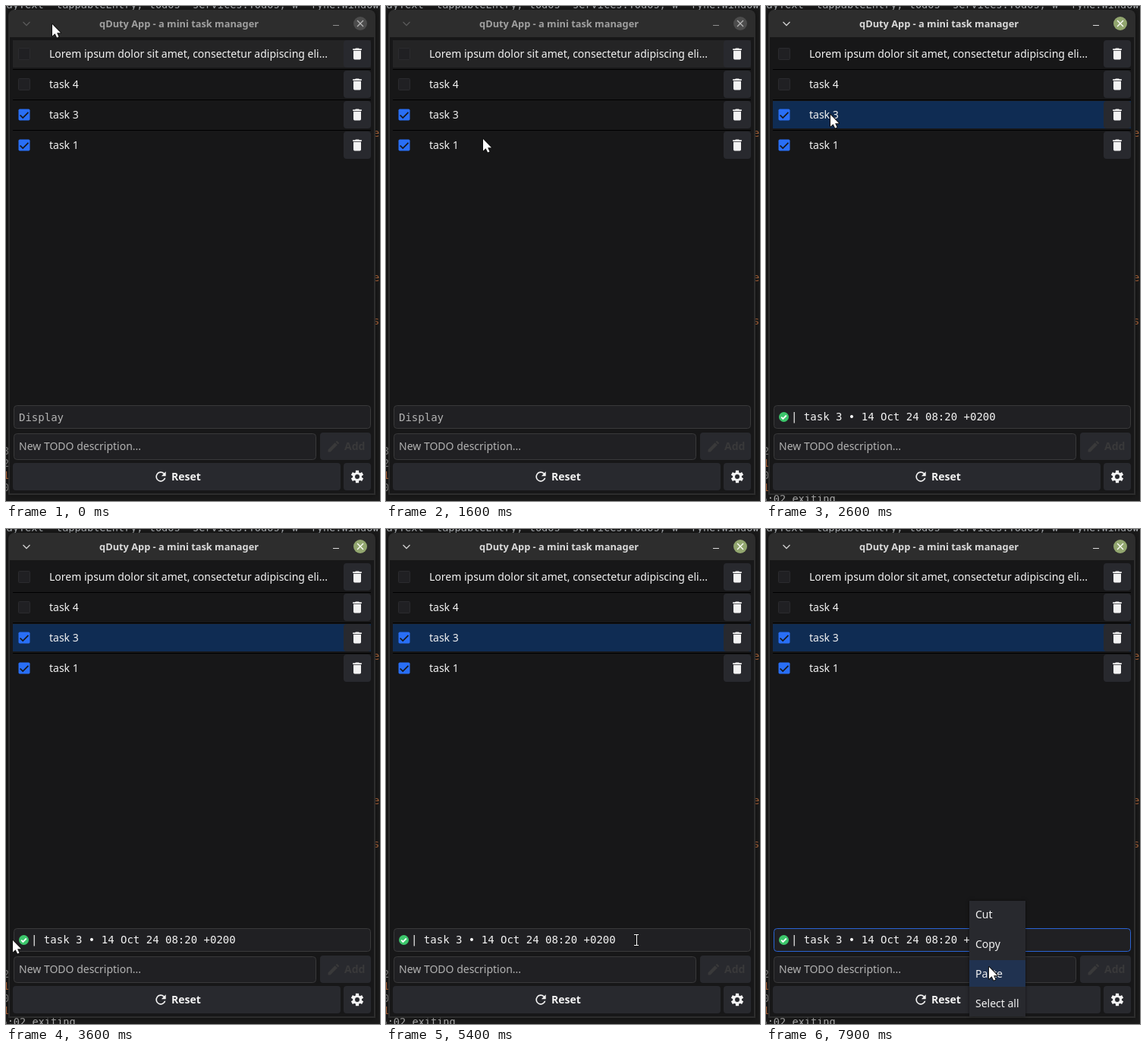
An HTML page with a canvas that plays this animation: 493x651 px, repeating every 8000 ms.

```html
<!DOCTYPE html>
<html lang="en">
<head>
<meta charset="utf-8">
<title>Task manager</title>
<style>
html, body { margin: 0; width: 100%; height: 100%; overflow: hidden; background: #1b1b1b; }
canvas { display: block; }
</style>
</head>
<body>
<canvas id="stage" width="493" height="651"></canvas>
<script>
const ctx = document.getElementById('stage').getContext('2d');
const LOOP = 8000, STEP = 100;
const SANS = '"Noto Sans", sans-serif';
const MONO = '"DejaVu Sans Mono", monospace';
const BODY = '14px ' + SANS, BOLD = 'bold 14px ' + SANS, ENTRY = '14px ' + MONO, CODE = '13.6px ' + MONO;
const WHITE = '#f3f3f3', BASE = '#171718', BUTTON = '#28292e', INPUT = '#202023', EDGE = '#39393a';
const HINT = '#b2b2b2', BLUE = '#296ff6', HOVER = '#242425', SELECTED = '#0f2c53';

// Icons on a 24 unit grid
const CHECK = new Path2D('M5 3h14a2 2 0 0 1 2 2v14a2 2 0 0 1-2 2H5a2 2 0 0 1-2-2V5a2 2 0 0 1 2-2z');
const TRASH = new Path2D('M6 19a2 2 0 0 0 2 2h8a2 2 0 0 0 2-2V7H6zM19 4h-3.5l-1-1h-5l-1 1H5v2h14z');
const RELOAD = new Path2D('M17.65 6.35A8 8 0 1 0 19.73 14h-2.08A6 6 0 1 1 16.22 7.78L13 11h7V4z');
const PEN = new Path2D('M3 17.25V21h3.75L17.81 9.94l-3.75-3.75zM20.7 7l-3.75-3.75-1.85 1.85 3.75 3.75z');
const ARROW = new Path2D('M0 0V15.5L3.6 12.2 6.1 17.5 8.5 16.4 6.1 11.2H11Z');
const IBEAM = new Path2D('M-3 -6.5H3M.5 -6.5V7.5M-3 7.5H3');

const TASKS = ['Lorem ipsum dolor sit amet, consectetur adipiscing eli...', 'task 4', 'task 3', 'task 1'];
const MENU = ['Cut', 'Copy', 'Paste', 'Select all'];

// Each move bends from the previous end through `via` to `end`
const HOME = [61, 24];
const MOVES = [
  { from: 100, to: 200, end: [11, -20] },
  { from: 400, to: 1000, via: [200, 112], end: [404, 58] },
  { from: 1600, to: 1600, end: [128, 175] },
  { from: 1700, to: 2100, via: [-60, 200], end: [85, 143] },
  { from: 2900, to: 3600, via: [355, 620], end: [9, 541] },
  { from: 3700, to: 4200, end: [118, 539] },
  { from: 4400, to: 4900, via: [410, 538], end: [339, 539] },
  { from: 5300, to: 5400, end: [330, 540] },
  { from: 6200, to: 6400, end: [269, 541] },
  { from: 7800, to: 7900, via: [387, 540], end: [294, 576] }
];

function pointerAt(t) {
  const now = Math.floor(t / STEP) * STEP;
  let pos = HOME;
  for (const { from, to, via, end } of MOVES) {
    if (now < from) break;
    const p = Math.min(1, (now - from + STEP) / (to - from + STEP));
    const e = p * p * (3 - 2 * p), start = pos;
    pos = end.map((b, i) => {
      const a = start[i], c = via ? via[i] : (a + b) / 2;
      return a * (1 - e) ** 2 + 2 * c * e * (1 - e) + b * e * e;
    });
  }
  return pos.map(Math.round);
}

function text(s, x, y, font, color, align = 'left') {
  ctx.font = font;
  ctx.fillStyle = color;
  ctx.textAlign = align;
  ctx.fillText(s, x, y);
}

function rect(x, y, w, h, color) {
  ctx.fillStyle = color;
  ctx.fillRect(x, y, w, h);
}

function box(x, y, w, h, r, fill, edge) {
  const o = edge ? 0.5 : 0;
  ctx.beginPath();
  ctx.roundRect(x + o, y + o, w - 2 * o, h - 2 * o, r);
  ctx.fillStyle = fill;
  ctx.fill();
  if (edge) { ctx.strokeStyle = edge; ctx.lineWidth = 1; ctx.stroke(); }
}

function button(x, y, w) {
  box(x, y, w, 36, 4, BUTTON);
}

function line(points, color, width) {
  ctx.beginPath();
  points.forEach(([x, y]) => ctx.lineTo(x, y));
  ctx.strokeStyle = color;
  ctx.lineWidth = width;
  ctx.stroke();
}

function disc(x, y, r, color) {
  ctx.beginPath();
  ctx.arc(x, y, r, 0, 7);
  ctx.fillStyle = color;
  ctx.fill();
}

function tick(cx, cy, s, color, width) {
  line([[cx - 3 * s, cy], [cx - s, cy + 2 * s], [cx + 3 * s, cy - 2 * s]], color, width);
}

function icon(path, cx, cy, color) {
  ctx.save();
  ctx.translate(cx - 10, cy - 10);
  ctx.scale(20 / 24, 20 / 24);
  ctx.fillStyle = color;
  ctx.fill(path);
  ctx.restore();
}

function gear(cx, cy) {
  ctx.save();
  ctx.translate(cx, cy);
  disc(0, 0, 6, WHITE);
  for (let i = 0; i < 6; i++) {
    ctx.fillRect(-2.1, -8.2, 4.2, 4);
    ctx.rotate(Math.PI / 3);
  }
  disc(0, 0, 3, BUTTON);
  ctx.restore();
}

function shadowed(blur, paint) {
  ctx.save();
  ctx.shadowColor = 'rgba(0,0,0,.55)';
  ctx.shadowBlur = blur;
  paint();
  ctx.restore();
}

function backdrop(active) {
  const orange = '#b56a3d', gray = '#8c8c8c';
  rect(0, 0, 493, 651, '#1b1b1b');
  text('ayText *tappableEntry, todos *services.Todos, w *fyne.Window', 0.5, 3, CODE, '#b0b4b8');
  text('e', 484, 172, CODE, orange);
  text('ee', 484, 362, CODE, orange);
  text('ss', 484, 419, CODE, orange);
  [...(active ? '2101' : '3210')].forEach((d, i) => {
    text(d, -4, 590 + 16 * i, CODE, d === '1' ? orange : gray);
  });
  if (active) text('5:02 exiting', -6.5, 653, CODE, '#b0b0b0');
}

function frame(active) {
  shadowed(6, () => box(3, 5, 484, 638, [8, 8, 0, 0], '#2d2d2d'));
  rect(5, 41, 480, 600, BASE);
  const ink = active ? '#dadada' : '#8d8d8d', cross = active ? '#fff' : '#b4b4b4';
  text('qDuty App - a mini task manager', 333, 28, '600 12.8px ' + SANS, active ? '#dadada' : '#a0a0a0', 'right');
  line([[22.5, 21], [27, 25.5], [31.5, 21]], active ? '#d0d0d0' : '#5a5a5a', 1.3);
  rect(431, 25, 8, 1, ink);
  disc(467, 23, 9, active ? '#92a66f' : '#4c4c4c');
  for (const d of [-4, 4]) line([[467 - d, 19], [467 + d, 27]], cross, 1.3);
}

function list(active, picked) {
  TASKS.forEach((name, i) => {
    const y = 43 + 40 * i, mid = y + 20;
    if (!active && i === 0) rect(9, y + 2, 472, 36, HOVER);
    if (picked && i === 2) rect(9, y + 2, 472, 36, SELECTED);
    if (i) rect(9, y, 472, 1, '#000');
    if (i > 1) {
      icon(CHECK, 24, mid, BLUE);
      tick(24, mid + 0.5, 1.8, BASE, 1.7);
    } else {
      box(16, mid - 8, 16, 16, 1, INPUT, '#2b2b2e');
    }
    text(name, 57, mid + 5, BODY, WHITE);
    button(445, y + 2, 36);
    icon(TRASH, 463, mid, WHITE);
  });
}

function form(picked, focused) {
  box(10, 525, 471, 31, 4, INPUT, focused ? '#2a63d4' : EDGE);
  if (picked) {
    disc(23.5, 540.5, 6.5, '#3cc66c');
    tick(23.5, 540.7, 1.1, '#fff', 1.8);
    text('| task 3 • 14 Oct 24 08:20 +0200', 33, 545, ENTRY, WHITE);
  } else {
    text('Display', 17, 546, ENTRY, HINT);
  }
  box(10, 562, 399, 35, 4, INPUT, EDGE);
  text('New TODO description...', 17, 584, BODY, HINT);
  button(414, 561, 67);
  icon(PEN, 432, 579, EDGE);
  text('Add', 446, 584, BOLD, EDGE);
  button(9, 601, 432);
  icon(RELOAD, 204, 619, WHITE);
  text('Reset', 218, 624, BOLD, WHITE);
  button(445, 601, 36);
  gear(463, 619);
}

function menu(hover) {
  shadowed(4, () => rect(268, 489, 74, 152, BUTTON));
  MENU.forEach((name, i) => {
    const y = 489 + 39 * i;
    if (i === hover) rect(268, y, 74, 35, '#203250');
    text(name, 276, y + 23, BODY, WHITE);
  });
}

function pointer(t) {
  const beam = t >= 3700 && t < 7300;
  const shape = beam ? IBEAM : ARROW;
  ctx.save();
  ctx.translate(...pointerAt(t));
  ctx.lineJoin = 'round';
  ctx.strokeStyle = '#111';
  ctx.lineWidth = 2;
  ctx.stroke(shape);
  if (beam) {
    ctx.strokeStyle = '#fff';
    ctx.lineWidth = 1;
    ctx.stroke(shape);
  } else {
    ctx.fillStyle = '#fff';
    ctx.fill(shape);
  }
  ctx.restore();
}

function draw(t) {
  const active = t >= 2500, picked = t >= 2600;
  backdrop(active);
  frame(active);
  list(active, picked);
  form(picked, t >= 7200);
  if (t >= 7300) menu(t >= 7900 ? 2 : t >= 7800 ? 1 : -1);
  pointer(t);
}

const start = performance.now();
function loop() {
  draw((performance.now() - start) % LOOP);
  requestAnimationFrame(loop);
}
loop();
</script>
</body>
</html>
```
